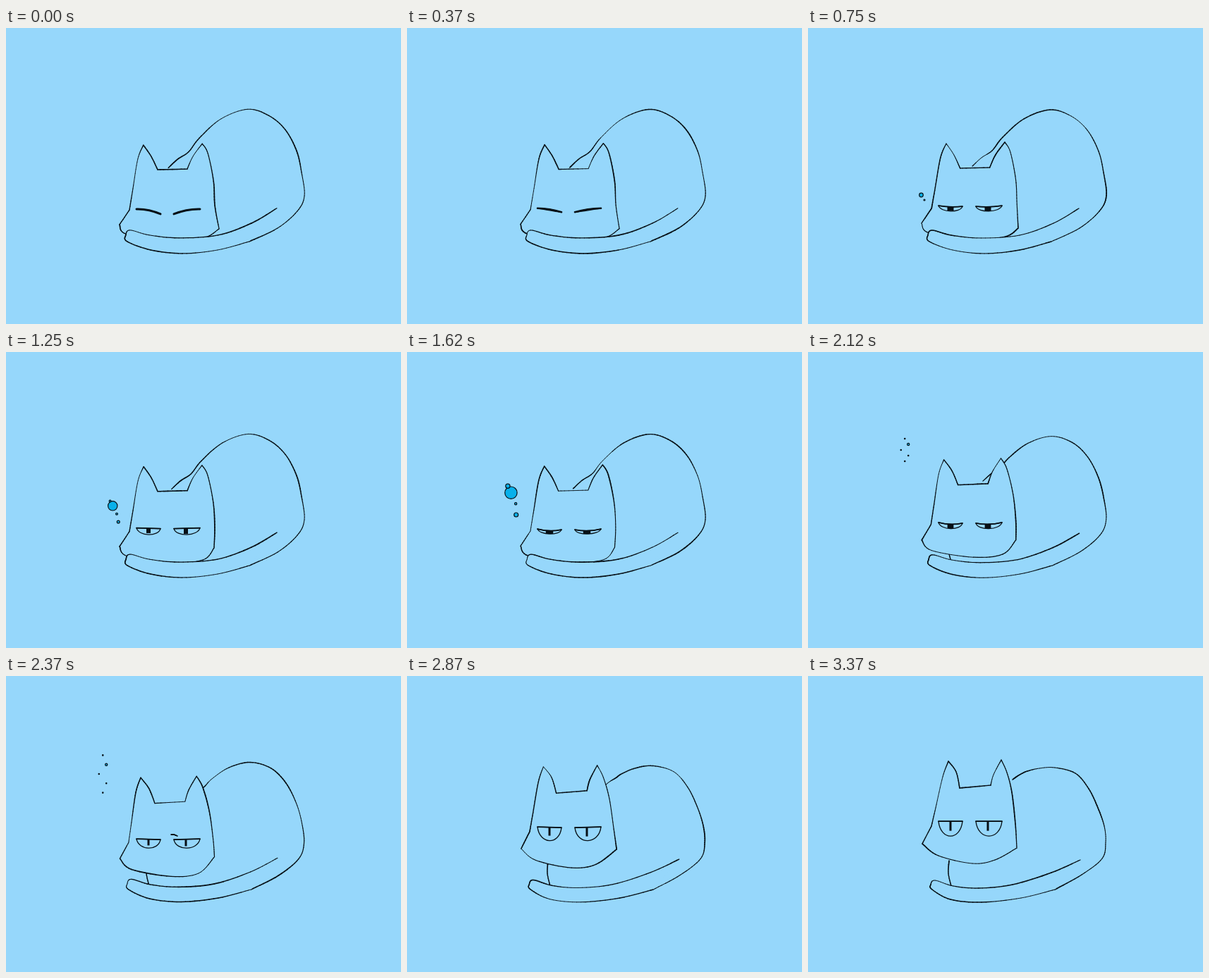
Animation of 560 by 420 pixels, one loop 3.87 s. Source, as an HTML page with a canvas:

```html
<!DOCTYPE html>
<html lang="en">
<head>
<meta charset="utf-8">
<title>Drowsy cat</title>
<style>
  html, body { margin: 0; width: 100%; height: 100%; overflow: hidden; background: #96d7fb; }
  canvas { display: block; }
</style>
</head>
<body>
<canvas id="stage" width="560" height="420"></canvas>
<script>
const ctx = document.getElementById('stage').getContext('2d');
const SKY = '#96d7fb', INK = '#071016', WATER = '#08b0ea';
const LOOP = 3870;
const STEPS = [0, 370, 500, 620, 750, 1000, 1250, 1500, 1620, 1750,
               1870, 2000, 2120, 2250, 2370, 2500, 2620, 2870, 3120, 3370];

const pts = s => s.split(' ').map(p => p.split(',').map(Number));
const mix = (a, b, k) => Array.isArray(a) ? a.map((v, i) => mix(v, b[i], k)) : a + (b - a) * k;

// Each outline has a lying and a sitting form; "rise" blends them
const BODY = [
  pts('233,196 246,184 261,174 276,155 306,129 343,116 373,125 396,145 412,175 419,205 423,238 413,260 385,284 345,303 300,315 250,320 205,315 172,303 170,294 176,287 203,294 245,298 300,294 348,277 384,256'),
  pts('290,147 297,142 304,138 311,135 328,131 350,130 379,138 398,160 411,187 420,213 422,236 417,259 388,282 350,303 302,315 246,321 202,317 176,303 174,296 180,290 206,298 242,301 290,296 345,279 386,261')
];
const HEAD = [
  pts('161,277 175,256 180,226 187,184 195,164 206,180 215,199 257,198 265,180 278,162 286,176 294,215 296,250 297,282 280,296 235,300 172,291'),
  pts('162,238 175,213 181,187 191,143 199,121 210,136 215,159 259,155 263,140 274,119 282,137 289,165 294,210 296,244 265,261 233,266 185,255')
];
const CORNERS = [0, 1, 4, 6, 7, 9, 13], JAW = 13, TAIL = 13;
const LEG = pts('200,262 199,280 203,298');

const POSES = [
  { step: 0,  rise: -0.05, lean: 0,  jaw: [5, 1],   open: 0,    sag: -2,  tilt: 7 },
  { step: 4,  rise: 0,     lean: 1,  jaw: [1, 2],   open: 6,    sag: 1.2, tilt: 1 },
  { step: 6,  rise: 0.03,  lean: 0,  jaw: [-2, -3], open: 9,    sag: 0,   tilt: 1 },
  { step: 10, rise: 0.06,  lean: -1, jaw: [-3, -3], open: 0,    sag: 4,   tilt: 1 },
  { step: 14, rise: 0.46,  lean: -6, jaw: [-1, -8], open: 12.5, sag: 0,   tilt: 1 },
  { step: 17, rise: 0.82,  lean: -5, jaw: [1, -5],  open: 19,   sag: 0,   tilt: 1 },
  { step: 19, rise: 1,     lean: 0,  jaw: [0, 0],   open: 21,   sag: 0,   tilt: 0 }
];
// Nose tick and raised brow
const MARKS = { 10: pts('234,241 233.5,246 235,248'), 14: pts('234,225 238,225 243,227') };

function poseAt(step) {
  const i = POSES.findLastIndex(p => p.step <= step);
  const a = POSES[i], b = POSES[i + 1] || a;
  const k = (step - a.step) / (b.step - a.step || 1);
  return Object.fromEntries(Object.keys(a).map(name => [name, mix(a[name], b[name], k)]));
}

// Catmull-Rom samples; corners break the tangent
function curve(list, corners = [], closed = false) {
  const n = list.length, out = [], spans = closed ? n : n - 1;
  const at = i => closed ? list[(i + n) % n] : list[Math.max(0, Math.min(n - 1, i))];
  for (let i = 0; i < spans; i++) {
    const b = at(i), c = at(i + 1);
    const a = corners.includes(i) ? b : at(i - 1);
    const d = corners.includes((i + 1) % n) ? c : at(i + 2);
    for (let t = 0; t < 1; t += 1 / 8) {
      out.push([0, 1].map(q => b[q] + t / 2 * (c[q] - a[q]
        + t * (2 * a[q] - 5 * b[q] + 4 * c[q] - d[q]
        + t * (3 * (b[q] - c[q]) + d[q] - a[q])))));
    }
  }
  out.push(at(spans));
  return out;
}

function trace(line) {
  ctx.beginPath();
  line.forEach(p => ctx.lineTo(p[0], p[1]));
}

function mask(line) {
  trace(line);
  ctx.fillStyle = SKY;
  ctx.fill();
}

// Pen line whose weight drifts along its length
function ink(line, seed) {
  for (let i = 1; i < line.length; i++) {
    ctx.lineWidth = 1.3 + 0.3 * Math.sin(i * 0.13 + seed) + 0.15 * Math.sin(i * 0.31 + seed * 2);
    trace([line[i - 1], line[i]]);
    ctx.stroke();
  }
}

function drawEye(x1, y1, x2, y2, pupil, open, sag) {
  ctx.beginPath();
  ctx.moveTo(x1, y1);
  ctx.quadraticCurveTo((x1 + x2) / 2, (y1 + y2) / 2 + sag * 2, x2, y2);
  ctx.lineWidth = 3 - 1.3 * Math.min(1, open / 5);
  ctx.stroke();
  if (open < 1) return;
  const low = (open + sag) * 4 / 3;
  ctx.bezierCurveTo(x2 - 3, y2 + low, x1 + 3, y1 + low, x1, y1);
  ctx.lineWidth = 1.3;
  ctx.stroke();
  ctx.save();
  ctx.clip();
  const w = 3 + Math.max(0, 12 - open);
  ctx.fillStyle = INK;
  ctx.fillRect(pupil - w / 2, y1, w, 3 + open / 2 + sag);
  ctx.restore();
}

function drop(x, y, r) {
  if (r < 0.4) return;
  ctx.beginPath();
  ctx.arc(x, y, r, 0, 7);
  ctx.fillStyle = WATER;
  ctx.fill();
  ctx.lineWidth = 1.2;
  ctx.stroke();
}

// A bubble swells and climbs with small ones around it, then bursts
function drawBubbles(step) {
  if (step >= 4 && step < 12) {
    const p = (step - 4) / 6;
    const x = 160.5 - 16 * Math.sqrt(p), y = 237 - 56 * p;
    for (const [lag, r0, r1] of [[0, 2.8, 10.3], [-0.6, -2, 4.5], [1, 1, 1.8], [2, 0, 3.8]]) {
      drop(x + 8 * Math.sin(lag * 0.6 * (1 + p)), y + lag * (7 + 13 * p), mix(r0, r1, p ** 0.6));
    }
  } else if (step >= 12 && step < 16) {
    const spread = Math.min(1, (step - 9) / 5);
    for (let i = -2; i <= 2; i++) {
      drop(137.8 - 6 * Math.cos(2.4 * i), 139 + 13.3 * i * spread, i === -1 ? 1.6 : 0.7);
    }
  }
}

function draw(step) {
  const { rise, lean, jaw, open, sag, tilt } = poseAt(step);
  const body = mix(...BODY, rise);
  const skull = mix(...HEAD, rise);
  const chin = skull[0][1];
  const head = curve(skull.map(([x, y], i) => i === JAW
    ? [x + jaw[0], y + jaw[1]]
    : [x + lean * Math.max(0, chin - y) / 117, y]), CORNERS, true);
  const tail = curve(body.slice(TAIL));

  ctx.fillStyle = SKY;
  ctx.fillRect(0, 0, 560, 420);
  ctx.strokeStyle = INK;
  ctx.lineCap = ctx.lineJoin = 'round';

  ink(curve(body.slice(0, TAIL + 1)), step);
  ink(curve(LEG), 1);
  mask(head);
  ink(head, step + 2);
  mask(tail);
  ink(tail, step + 4);

  const eye = chin - 22 - open * 0.47;
  drawEye(185, eye, 219, eye + tilt, 202, open, sag);
  drawEye(238, eye + tilt, 275, eye, 255, open, sag);
  if (MARKS[step]) ink(curve(MARKS[step]), 0);
  drawBubbles(step);
}

let shown = -1;
function tick() {
  const time = performance.now() % LOOP;
  const step = STEPS.findLastIndex(t => t <= time);
  if (step !== shown) draw(shown = step);
  requestAnimationFrame(tick);
}
tick();
</script>
</body>
</html>
```
